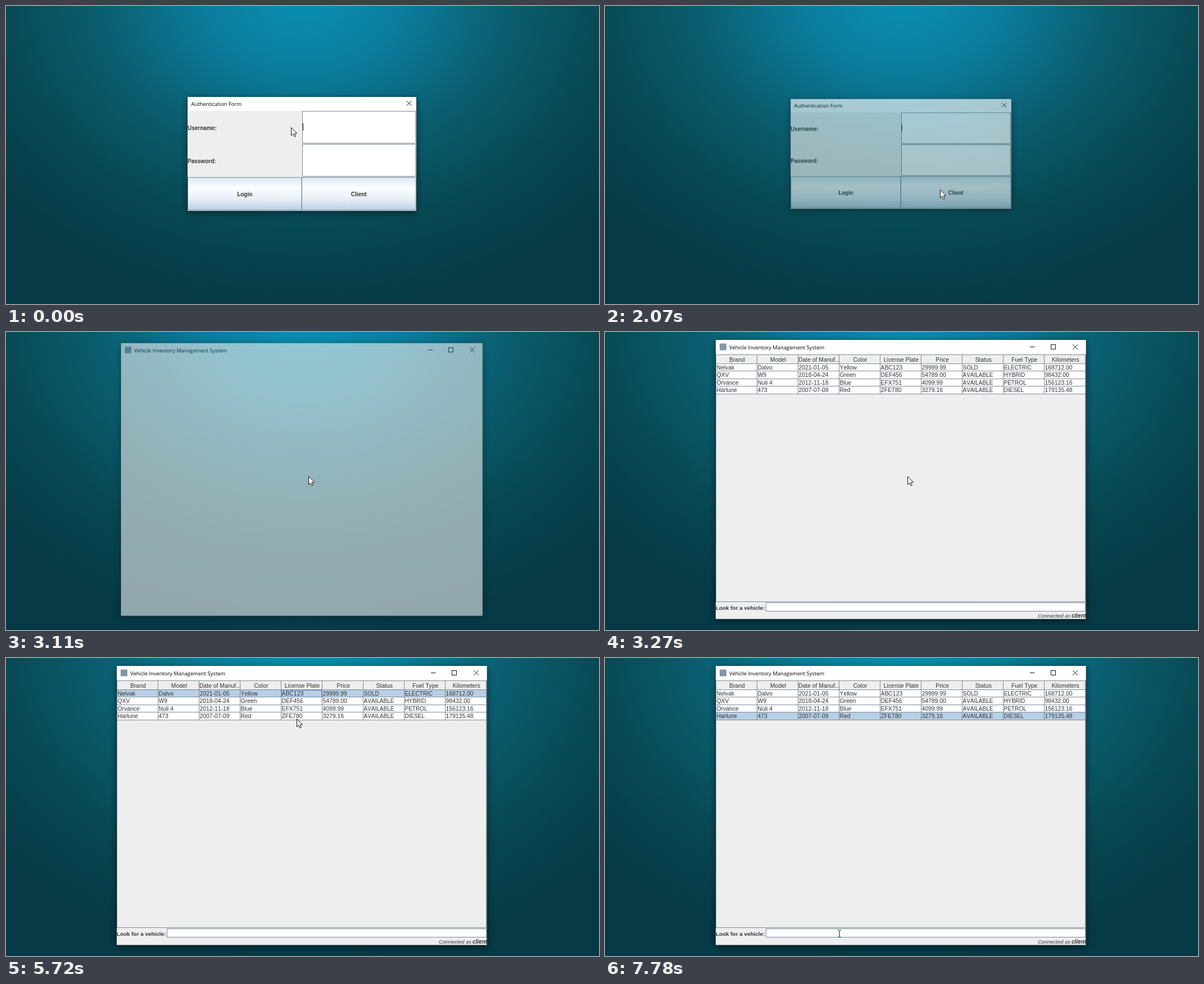
Recreate the animation shown at these times as an HTML page with a canvas. Size 1055x531 px, loop 8 s.

```html
<!DOCTYPE html>
<html lang="en">
<head>
<meta charset="utf-8">
<title>Vehicle Inventory</title>
<style>
html, body { margin: 0; width: 100%; height: 100%; overflow: hidden; background: #073a48; }
canvas { display: block; }
</style>
</head>
<body>
<canvas id="stage" width="1055" height="531"></canvas>
<script>
const W = 1055, H = 531, LOOP = 8000;
const SANS = '"Liberation Sans", Arial, sans-serif';
const TITLE = '9.35px "Open Sans", "Noto Sans", sans-serif';
const LINE = '#7a8a99', PANEL = '#eeeeee', INK = '#333333', SELECT = '#b8cfe5';

const screen = document.getElementById('stage').getContext('2d');
const makeLayer = () => {
  const c = document.createElement('canvas');
  c.width = W;
  c.height = H;
  return c.getContext('2d');
};
const layer = makeLayer();
const wallpaper = makeLayer();
let g = screen;

// Each glide of the pointer slows down towards its goal
const HOME = { x: 507, y: 216 };
const GLIDES = [
  { from: 80, to: 310, x: 512, y: 169 },
  { from: 550, to: 690, x: 576, y: 190 },
  { from: 1110, to: 1580, x: 596, y: 327 },
  { from: 2240, to: 2400, x: 592, y: 320 },
  { from: 3040, to: 3110, x: 538, y: 257 },
  { from: 3300, to: 3890, x: 553, y: 105 },
  { from: 4380, to: 4540, x: 524, y: 78 },
  { from: 4690, to: 4940, x: 520, y: 62 },
  { from: 5420, to: 5950, x: 517, y: 110 },
  { from: 6660, to: 7290, x: 417, y: 491 }
];

const HEADS = ['Brand', 'Model', 'Date of Manuf...', 'Color', 'License Plate',
  'Price', 'Status', 'Fuel Type', 'Kilometers'];
const ROWS = [
  'Nelvak|Dalvo|2021-01-05|Yellow|ABC123|29999.99|SOLD|ELECTRIC|168712.00',
  'QXV|W9|2018-04-24|Green|DEF456|54789.00|AVAILABLE|HYBRID|98432.00',
  'Orvance|Nuli 4|2012-11-18|Blue|EFX751|4099.99|AVAILABLE|PETROL|156123.16',
  'Harlune|473|2007-07-09|Red|ZFE780|3279.16|AVAILABLE|DIESEL|179135.48'
].map(row => row.split('|'));

const between = (t, a, b) => t >= a && t < b;
const progress = (t, a, b) => Math.min(1, Math.max(0, (t - a) / (b - a)));
const easeOut = (p, power) => 1 - Math.pow(1 - p, power);
const blink = (t, since) => Math.floor((t - since) / 495) % 2 === 0;

function fill(x, y, w, h, color) {
  g.fillStyle = color;
  g.fillRect(x, y, w, h);
}

function frame(x, y, w, h, color = LINE) {
  g.strokeStyle = color;
  g.lineWidth = 1;
  g.strokeRect(x + 0.5, y + 0.5, w - 1, h - 1);
}

function line(x1, y1, x2, y2, color = LINE, width = 1) {
  g.strokeStyle = color;
  g.lineWidth = width;
  g.beginPath();
  g.moveTo(x1, y1);
  g.lineTo(x2, y2);
  g.stroke();
}

function text(str, x, y, font, align = 'left', color = INK) {
  g.font = font;
  g.textAlign = align;
  g.fillStyle = color;
  g.fillText(str, x, y);
}

function spread(gradient, colors) {
  colors.forEach((color, i) => gradient.addColorStop(i / (colors.length - 1), color));
  return gradient;
}

function paintWallpaper() {
  g = wallpaper;
  g.save();
  g.translate(530, -20);
  g.scale(730, 560);
  g.fillStyle = spread(g.createRadialGradient(0, 0, 0, 0, 0, 1),
    ['#0a90b4', '#0b7c9c', '#0a5d6f', '#074852', '#063a47']);
  g.fillRect(-1, -1, 2, 2);
  g.restore();
}

function windowBase(x, y, w, h, color) {
  g.save();
  g.shadowColor = 'rgba(0,0,0,0.5)';
  g.shadowBlur = 13;
  g.shadowOffsetY = 3;
  fill(x, y, w, h, color);
  g.restore();
  frame(x - 1, y - 1, w + 2, h + 2, 'rgba(20,35,40,0.45)');
}

function closeMark(x, y) {
  const r = 4.3;
  line(x - r, y - r, x + r, y + r, '#111');
  line(x - r, y + r, x + r, y - r, '#111');
}

function button(x, w, label) {
  const shade = g.createLinearGradient(0, 305, 0, 364);
  fill(x, 305, w, 59, spread(shade, ['#dde8f3', '#fbfdfe', '#e6eef6', SELECT]));
  frame(x, 305, w, 59);
  text(label, x + w / 2, 338.5, `bold 10px ${SANS}`, 'center');
}

function loginWindow(caret) {
  windowBase(323, 162, 407, 203, '#fff');
  text('Authentication Form', 329.5, 177.5, TITLE, 'left', '#000');
  closeMark(717, 173.5);
  fill(323, 187, 407, 178, PANEL);
  ['Username:', 'Password:'].forEach((label, i) => {
    const y = 187 + i * 59;
    fill(527, y, 202, 58, '#fff');
    frame(527, y, 202, 58);
    text(label, 323, y + 33.5, `bold 10px ${SANS}`);
  });
  button(323, 203.5, 'Login');
  button(526, 203.5, 'Client');
  if (caret) fill(528, 209, 1, 13, '#222');
}

function titleBar() {
  fill(204, 20.5, 12, 12, '#8196a6');
  text('Vehicle Inventory Management System', 221, 30.5, TITLE, 'left', '#000');
  line(756, 26.5, 764.5, 26.5, '#111');
  frame(793, 22, 9, 9, '#111');
  closeMark(836.5, 26.5);
}

function table(selected, focused) {
  const left = 197, top = 57, colW = 73.05, rowH = 13.4;
  const colX = i => Math.round(left + i * colW);
  const rowY = i => Math.round(top + i * rowH);
  line(left, 40.5, 855, 40.5);
  ROWS.forEach((row, r) => {
    fill(left, rowY(r), 657, rowY(r + 1) - rowY(r), r === selected ? SELECT : '#fff');
  });
  for (let r = 0; r <= ROWS.length; r++) line(left, rowY(r) - 0.5, 854, rowY(r) - 0.5);
  for (let c = 0; c < HEADS.length; c++) line(colX(c) + 0.5, 40, colX(c) + 0.5, rowY(4));
  HEADS.forEach((head, c) => {
    text(head, left + (c + 0.5) * colW + 1.3, 53, `10.4px ${SANS}`, 'center');
  });
  ROWS.forEach((row, r) => row.forEach((cell, c) => {
    const size = /^[A-Z]{4,}$/.test(cell) ? 10 : 10.4;
    text(cell, colX(c) + 1.5, rowY(r) + 10.4, `${size}px ${SANS}`);
  }));
  if (focused) frame(colX(4) + 1, rowY(selected), colX(5) - colX(4) - 1, 13, '#6382bf');
}

function inventoryWindow(t) {
  const loaded = t >= 3250;
  windowBase(197, 14, 658.5, 497.5, PANEL);
  if (loaded) fill(197, 14, 658.5, 26, '#fff');
  titleBar();
  if (!loaded) return;
  g.save();
  g.beginPath();
  g.rect(197, 14, 658.5, 497.5);
  g.clip();
  frame(197, 40, 658, 441);
  const selected = t < 4850 ? -1 : t < 6200 ? 0 : 3;
  table(selected, selected >= 0 && t < 7290);
  text('Look for a vehicle:', 197, 495, `bold 9.9px ${SANS}`);
  fill(286, 482, 569, 16, '#fff');
  frame(286, 482, 569, 16);
  if (t >= 7290 && blink(t, 7285)) fill(287, 484, 1, 13, '#222');
  text('Connected as', 770, 509, `italic 9.4px ${SANS}`);
  text('client', 830, 509, `italic bold 10px ${SANS}`);
  g.restore();
}

// Paints a window as one sheet, faded and scaled about its centre
function faded(alpha, scale, paint) {
  g = layer;
  g.clearRect(0, 0, W, H);
  paint();
  g = screen;
  g.save();
  g.globalAlpha = alpha;
  g.translate(526.5, 263);
  g.scale(scale, scale);
  g.drawImage(layer.canvas, -526.5, -263);
  g.restore();
}

function arrow() {
  g.translate(0.5, 0.5);
  const shape = new Path2D('M0 0V14.3L3.3 11.4 5.6 16.4 7.9 15.4 5.7 10.6 10 10.3Z');
  g.fillStyle = '#fff';
  g.fill(shape);
  g.strokeStyle = '#111';
  g.lineWidth = 1;
  g.stroke(shape);
}

function beam() {
  line(0, -5.5, 0, 6, '#111', 1.1);
  for (const y of [-6, 6.5]) {
    line(-3, y, -0.7, y, '#111');
    line(0.7, y, 3, y, '#111');
  }
}

function magnifier() {
  line(3, 3.5, 7.5, 8, '#111', 2);
  g.beginPath();
  g.arc(0, 0.3, 4.7, 0, Math.PI * 2);
  g.fillStyle = '#fff';
  g.fill();
  g.strokeStyle = '#111';
  g.lineWidth = 1;
  g.stroke();
  line(-2.5, 0.3, 2.5, 0.3, '#111', 1.5);
  line(0, -2.2, 0, 2.8, '#111', 1.5);
}

function pointer(t) {
  let { x, y } = HOME;
  for (const glide of GLIDES) {
    const p = easeOut(progress(t, glide.from, glide.to), 4);
    x += (glide.x - x) * p;
    y += (glide.y - y) * p;
  }
  x = Math.round(x);
  y = Math.round(y);
  const overLogin = t < 2000 && x > 527 && between(y, 187, 304);
  const overSearch = t > 3250 && x > 286 && between(y, 483, 498);
  g.save();
  g.translate(x, y);
  if (between(t, 2170, 3040)) magnifier();
  else if (overLogin || overSearch) beam();
  else arrow();
  g.restore();
}

function draw(t) {
  g = screen;
  g.drawImage(wallpaper.canvas, 0, 0);
  if (t < 2000) {
    loginWindow(blink(t, -395));
  } else if (t < 2200) {
    const p = progress(t, 2000, 2200);
    faded(1 - p, 1 - 0.1 * p, () => loginWindow(true));
  } else if (between(t, 3040, 3200)) {
    const alpha = easeOut(progress(t, 3020, 3200), 1.32);
    faded(alpha, 0.942 + 0.058 * alpha, () => inventoryWindow(t));
  } else if (t >= 3200) {
    inventoryWindow(t);
  }
  pointer(t);
}

for (const ctx of [screen, layer]) ctx.fontKerning = 'none';
paintWallpaper();
const start = performance.now();
function tick() {
  draw((performance.now() - start) % LOOP);
  requestAnimationFrame(tick);
}
tick();
</script>
</body>
</html>
```
